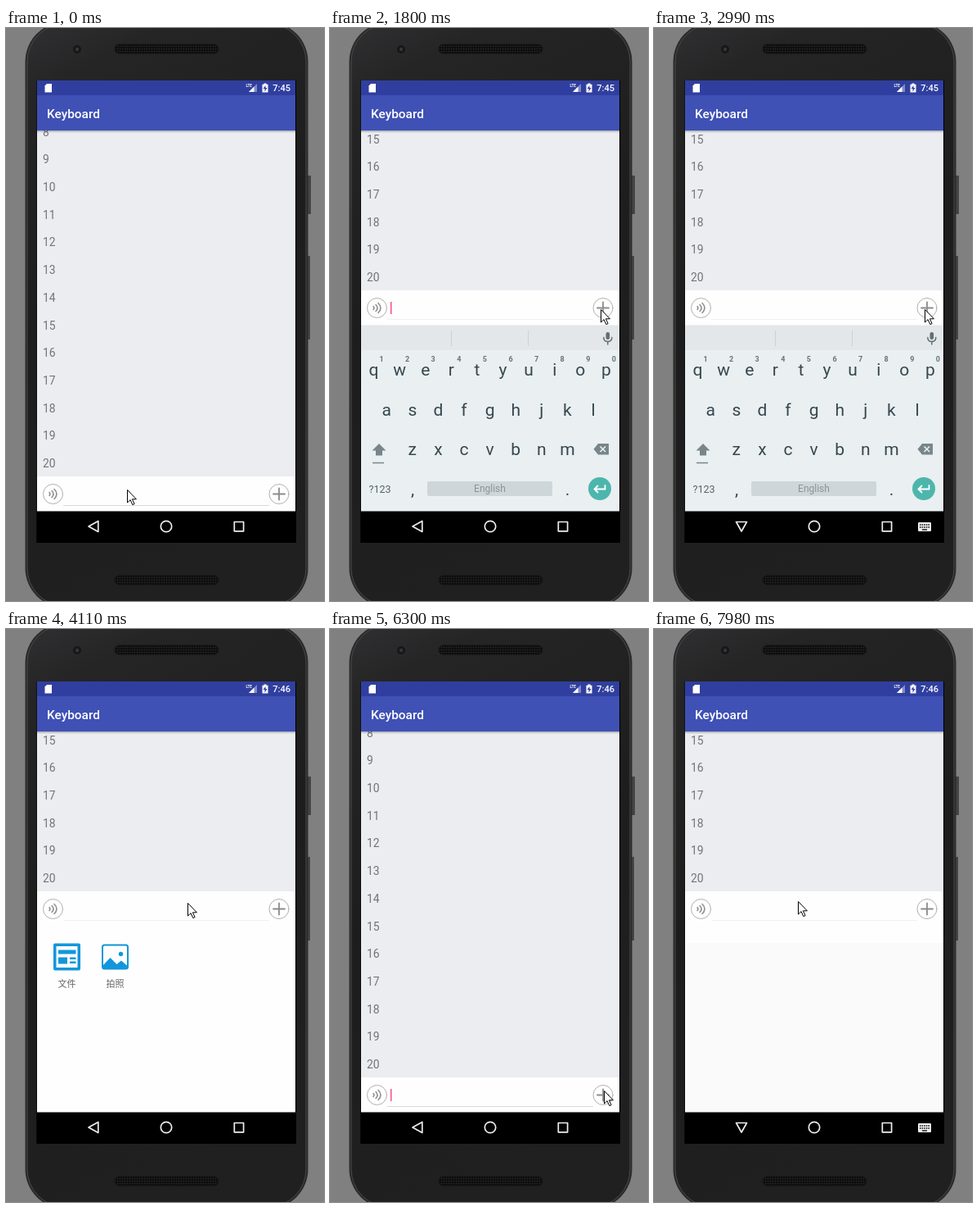
Recreate the animation shown at these times as an HTML page. Size 389 by 699 pixels, loop 8000 ms.

```html
<!DOCTYPE html>
<html lang="en">
<head>
<meta charset="utf-8">
<title>Keyboard panel</title>
<style>
html, body { margin: 0; width: 100%; height: 100%; overflow: hidden; background: #808080; }
svg { display: block; width: 100%; height: 100%; }
text { font-family: Roboto, "Noto Sans CJK SC", "Noto Sans CJK", sans-serif; }
.mid { text-anchor: middle; }
.line { fill: none; stroke-linecap: round; }
</style>
</head>
<body>
<svg viewBox="0 0 389 699">
  <defs>
    <linearGradient id="face" x2=".25" y2="1">
      <stop offset="0" stop-color="#303032"/><stop offset=".12" stop-color="#252526"/>
      <stop offset=".5" stop-color="#1d1d1d"/><stop offset="1" stop-color="#202020"/>
    </linearGradient>
    <linearGradient id="shade" x2="0" y2="1">
      <stop offset="0" stop-color="#000" stop-opacity=".28"/><stop offset="1" stop-color="#000" stop-opacity="0"/>
    </linearGradient>
    <pattern id="mesh" width="3" height="3" patternUnits="userSpaceOnUse">
      <rect width="3" height="3" fill="#0e0e0e"/><circle cx="1.5" cy="1.5" r=".8" fill="#2b2b2b"/>
    </pattern>
    <clipPath id="listClip"><rect id="listArea" x="38" y="125" width="316" height="422"/></clipPath>
    <clipPath id="lowerClip"><rect x="38" y="362" width="316" height="228"/></clipPath>
  </defs>

  <!-- phone -->
  <rect width="389" height="699" fill="#808080"/>
  <path d="M368 180h5v47h-5zM368 278h4v102h-4z" fill="#444"/>
  <rect x="23.500" y="-7" width="346" height="714" rx="48" fill="#2a2a2a"/>
  <rect x="26" y="-5" width="341" height="710" rx="46" fill="url(#face)" stroke="#484849"/>
  <circle cx="87" cy="26" r="5" fill="#171718"/><circle cx="87" cy="26" r="2.200" fill="#34363a"/>
  <rect x="133" y="20" width="127" height="11" rx="5.500" fill="url(#mesh)" stroke="#131313"/>
  <rect x="133" y="668" width="127" height="11" rx="5.500" fill="url(#mesh)" stroke="#131313"/>
  <rect x="37.500" y="64" width="317.500" height="564" fill="#000"/>

  <!-- list -->
  <rect x="38" y="125" width="316" height="465" fill="#ebedf0"/>
  <g clip-path="url(#listClip)"><g id="list" font-size="13.85" fill="#737375"></g></g>

  <!-- app bar -->
  <rect x="38" y="125" width="316" height="3" fill="url(#shade)"/>
  <rect x="38" y="64" width="316" height="18" fill="#303f9f"/>
  <rect x="38" y="82" width="316" height="43" fill="#3f51b5"/>
  <g fill="#fff">
    <path d="M50 68h6v10.500H47.500V70.500z"/>
    <path d="M307 68v10h-10z" opacity=".4"/><path d="M303.500 71.500V78H297z"/>
    <text x="293.500" y="72" font-size="4.500" font-weight="700">LTE</text>
    <path d="M315.500 67.500h3v1.200h2v9.800h-7v-9.800h2z"/>
    <path d="M317.500 70l-3 4h2v3.500l3-4.500h-2z" fill="#303f9f"/>
    <text id="clock" x="348" y="77" font-size="11" font-weight="500" text-anchor="end"></text>
    <text x="50" y="110" font-size="15.4" font-weight="500">Keyboard</text>
  </g>

  <!-- panel -->
  <g id="lower">
    <rect x="38" y="362" width="316" height="228" fill="#fefefe"/>
    <rect id="tint" x="38" y="383" width="316" height="207" fill="#fafafa"/>
    <g id="icons" fill="#1296db">
      <path d="M60 383.500h29q2 0 2 2v29q0 2-2 2h-29q-2 0-2-2v-29q0-2 2-2zM61.500 387v26h26v-26z" fill-rule="evenodd"/>
      <path d="M64 391.500h21.500v5h-21.500zM64 400.500h11v8h-11zM78 400.500h7.500v2.500h-7.500zM78 405.500h7.500v2.500h-7.500z"/>
      <rect x="118" y="385.500" width="31" height="29" rx="2.500" fill="#fefefe" stroke="#1296db" stroke-width="2"/>
      <path d="M118 411l9.500-10 8 8 5.500-4.500 8 7v3h-31z"/><circle cx="140.500" cy="396.500" r="2.700"/>
      <g class="mid" font-size="11" fill="#666">
        <text x="74.500" y="436.500">文件</text><text x="133.500" y="436.500">拍照</text>
      </g>
    </g>
    <g clip-path="url(#lowerClip)"><g id="keyboard">
      <rect x="38" y="362" width="316" height="228" fill="#eaeff1"/>
      <rect x="38" y="362" width="316" height="31" fill="#e3e7e9"/>
      <path d="M148.500 369v19M242.500 369v19" stroke="#cbd1d4"/>
      <g fill="#636f75">
        <rect x="337.500" y="371" width="4.600" height="9" rx="2.300"/>
        <path class="line" d="M334.800 377.500q0 5 5 5t5-5M339.800 382.500v3.500" stroke="#636f75" stroke-width="1.500"/>
      </g>
      <g id="keys" class="mid" font-size="21" fill="#37474f"></g>
      <g id="hints" class="mid" font-size="9" font-weight="700" fill="#66757c"></g>
      <path d="M60 507l8.500 8.500h-4.500v6h-8v-6H51.500z" fill="#78868c"/>
      <path d="M52 530.500h14" stroke="#78868c" stroke-width="1.500"/>
      <path d="M328 507h13v13.500h-13l-5.500-6.800z" fill="#78868c"/>
      <path d="M330.500 510.500l6.500 6.500M337 510.500l-6.500 6.500" stroke="#eaeff1" stroke-width="1.600"/>
      <rect x="119" y="553" width="153" height="18" rx="2" fill="#cfd6d9"/>
      <g class="mid">
        <text x="61" y="566.500" font-size="12.500" fill="#546369">?123</text>
        <text x="195.500" y="566" font-size="12" fill="#89949a">English</text>
        <g font-size="21" fill="#37474f"><text x="101" y="569.500">,</text><text x="290.500" y="569.500">.</text></g>
      </g>
      <circle cx="330" cy="562" r="14" fill="#4db6ac"/>
      <path class="line" d="M336.500 558v4.500h-12.500M327.500 558.500l-4 4 4 4" stroke="#fff" stroke-width="1.800"/>
    </g></g>
  </g>

  <!-- input bar -->
  <g id="bar">
    <rect x="38" y="547" width="316" height="42.500" fill="#fefefe"/>
    <path id="rule" d="M70 582.500h252"/>
    <g class="line" stroke="#8c8c8c">
      <circle cx="57.500" cy="568.500" r="12" stroke="#b0b0b0"/><circle cx="334" cy="568.500" r="12" stroke="#b0b0b0"/>
      <path d="M53 566.500q1.800 2 0 4M56 564.500q4 4 0 8M59 562.500q6 6 0 12" stroke-width="1.500"/>
      <path d="M327 568.500h14M334 561.500v14" stroke-width="1.800"/>
    </g>
    <rect id="caret" x="74" y="561" width="1.400" height="15" fill="#ff4081"/>
  </g>

  <!-- navigation bar -->
  <rect x="37.500" y="589.500" width="317.500" height="38.500" fill="#000"/>
  <g fill="none" stroke="#eee" stroke-width="1.700" stroke-linejoin="round">
    <path id="back"/><circle cx="196" cy="608" r="6.700"/><rect x="279.300" y="602.500" width="11.300" height="11.300"/>
  </g>
  <g id="switcher">
    <rect x="323" y="603" width="16" height="11" rx="1.200" fill="#eee"/>
    <path d="M325 606h12M325 609h12" stroke="#000" stroke-width="1.500" stroke-dasharray="1.500 1.100"/>
    <path d="M328 612h6" stroke="#000" stroke-width="1.300"/>
  </g>

  <path id="cursor" d="M.5.500v15.500l3.600-3.400 2.700 6 2.300-1-2.700-5.800h5z" fill="#fff" stroke="#000"/>
</svg>
<script>
const LOOP = 8000;
const el = id => document.getElementById(id);
const show = (id, on) => el(id).setAttribute("visibility", on ? "visible" : "hidden");
const shift = (id, x, y) => el(id).setAttribute("transform", `translate(${x} ${y})`);

function addText(parent, x, y, label) {
  const node = document.createElementNS("http://www.w3.org/2000/svg", "text");
  node.setAttribute("x", x);
  node.setAttribute("y", y);
  node.textContent = label;
  el(parent).append(node);
}

for (let n = 8; n <= 20; n++) addText("list", 45, 199 + (n - 10) * 33.72, n);
[["qwertyuiop", 53.5, 424], ["asdfghjkl", 69.2, 472.5], ["zxcvbnm", 100.8, 520.5]]
  .forEach(([row, x, y]) => [...row].forEach((key, i) => addText("keys", x + i * 31.6, y, key)));
[..."1234567890"].forEach((digit, i) => addText("hints", 63 + i * 31.6, 406.5, digit));

// Bursts of screen updates: first, last, count.
const bursts = [
  [440, 1370, 8], [1520, 1520, 1], [1800, 1920, 2], [2070, 2070, 1], [2440, 2440, 1],
  [2750, 2990, 3], [3140, 3140, 1], [3420, 4110, 6], [4230, 4350, 2], [4500, 5490, 8],
  [5640, 6300, 6], [6610, 6760, 2], [7040, 7980, 7]
];
const ticks = [0];
for (const [first, last, count] of bursts)
  for (let i = 0; i < count; i++)
    ticks.push(count > 1 ? Math.round(first + (last - first) * i / (count - 1)) : first);

// Times at which each part flips, starting from off.
const flips = {
  raised: [570, 5770, 6610],
  icons: [2070, 2860, 3830, 4640, 6760, 7820],
  down: [440, 1800, 2860, 3550, 4640, 5640, 7980],
  caret: [440, 970, 1520, 2070, 2440, 2750, 3140, 3690, 4500, 5060, 5490, 5900, 6300, 6610, 7040, 7510],
  late: [3690],
  tint: [6610]
};
// Time and visible share of the keyboard.
const slide = [[0, 0], [570, .5], [700, 1], [1920, 0], [2860, .6], [2990, 1],
  [3690, 0], [4780, .6], [4920, 1], [5770, 0]];
// Time, x and y of the pointer.
const path = [[0, 148, 563], [830, 148, 563], [1370, 331, 349], [1520, 331, 343], [3690, 331, 343],
  [4110, 222, 334], [4350, 190, 331], [4780, 190, 331], [5490, 100, 613], [5770, 100, 613],
  [6300, 335, 563], [7040, 335, 563], [7510, 176, 328], [7980, 176, 332], [LOOP, 176, 332]];

const isOn = (name, t) => flips[name].filter(at => at <= t).length % 2 === 1;

function pointer(t) {
  const i = path.findIndex(p => p[0] > t);
  const [t0, x0, y0] = path[i - 1], [t1, x1, y1] = path[i];
  const u = (t - t0) / (t1 - t0), k = u * u * (3 - 2 * u);
  return [Math.round(x0 + (x1 - x0) * k), Math.round(y0 + (y1 - y0) * k)];
}

function draw(t) {
  const raised = isOn("raised", t), down = isOn("down", t);
  const lift = raised ? -227 : 0;
  const share = slide.filter(s => s[0] <= t).pop()[1];
  shift("list", 0, lift);
  shift("bar", 0, lift);
  el("listArea").setAttribute("height", 422 + lift);
  el("rule").setAttribute("stroke", raised ? "#efefef" : "#d9d9d9");
  el("lower").setAttribute("display", raised ? "inline" : "none");
  show("icons", isOn("icons", t));
  show("tint", isOn("tint", t));
  show("keyboard", share > 0);
  shift("keyboard", 0, 228 * (1 - share));
  show("caret", isOn("caret", t));
  show("switcher", down);
  el("back").setAttribute("d", down ? "M100.500 602.500h13l-6.500 11.500z" : "M101 608l11.800-6.500v13z");
  el("clock").textContent = isOn("late", t) ? "7:46" : "7:45";
  shift("cursor", ...pointer(t));
}

let shown = -1;
const start = performance.now();
function frame() {
  const now = (performance.now() - start) % LOOP;
  const tick = ticks.filter(t => t <= now).pop();
  if (tick !== shown) draw(shown = tick);
  requestAnimationFrame(frame);
}
frame();
</script>
</body>
</html>
```
